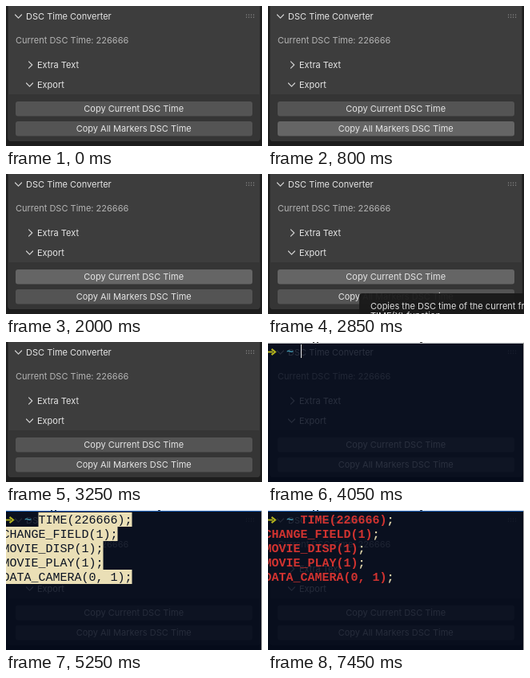
An HTML page that plays this animation: 320 px wide and 176 px high, repeating every 9900 ms.

```html
<!DOCTYPE html>
<html lang="en">
<head>
<meta charset="utf-8">
<title>DSC Time Converter</title>
<style>
  html, body { margin: 0; width: 100%; height: 100%; overflow: hidden; background: #1d1d1d; }
  svg { display: block; width: 100%; height: 100%; }
  .ui { font: 11px Inter, sans-serif; fill: #e6e6e6; }
  .icon { fill: none; stroke: #cfcfcf; stroke-width: 1.2; stroke-linecap: round; stroke-linejoin: round; }
  .mid { text-anchor: middle; }
  .mono { font: 15px "Liberation Mono", monospace; white-space: pre; }
  .bold { font-weight: bold; }
</style>
</head>
<body>
<svg viewBox="0 0 320 176">
  <rect width="320" height="176" fill="#1d1d1d"/>
  <g class="ui">
    <path d="M2.5 0H317.5V166a4 4 0 0 1-4 4H6.5a4 4 0 0 1-4-4Z" fill="#3d3d3d"/>
    <path d="M2.5 111H317.5V166a4 4 0 0 1-4 4H6.5a4 4 0 0 1-4-4Z" fill="#353535"/>
    <path class="icon" d="M11.5 11l4 4.2 4-4.2M28.5 69.8l4.2 4.2-4.2 4.2M25.5 97l4 4.2 4-4.2"/>
    <g id="grip" fill="#8a8a8a"></g>
    <text x="25" y="17">DSC Time Converter</text>
    <text x="12" y="47" fill="#b4b4b4">Current DSC Time: 226666</text>
    <text x="39" y="78">Extra Text</text>
    <text x="39" y="103">Export</text>
    <rect id="current" x="12" y="120" width="296" height="18.5" rx="3"/>
    <rect id="markers" x="12" y="145" width="296" height="18.5" rx="3"/>
    <text class="mid" x="159.7" y="133">Copy Current DSC Time</text>
    <text class="mid" x="159.7" y="158">Copy All Markers DSC Time</text>
    <g id="tip">
      <rect x="114" y="150" width="230" height="50" rx="4" fill="#191919"/>
      <text x="128" y="170">Copies the DSC time of the current frame</text>
      <text x="128" y="182">TIME(X) function.</text>
    </g>
  </g>
  <g id="term">
    <rect id="shade" width="319" height="176" fill="#00081a"/>
    <rect x="319" width="1" height="176" fill="#a0a0a0"/>
    <rect width="320" height="1" fill="#f0f0f0"/>
    <path d="M56 .5h2M61 .5h2M190 .5h3" stroke="#333"/>
    <rect id="edge" y="1" width="319" height="1"/>
    <path d="M0 12.5H6M4.5 8.8L9 12.5 4.5 16.2" fill="none" stroke="#b0af1e" stroke-width="2.2"/>
    <text class="mono bold" x="23" y="17" fill="#3f8fa8">~</text>
    <rect id="cursor" x="41" y="3" width="1" height="17" fill="#e8e8e8"/>
    <g id="pasted"></g>
    <g id="plain"></g>
  </g>
</svg>
<script>
const LOOP = 9900, COL = 9, ROW = 18;
const $ = id => document.getElementById(id);
const LINES = ['TIME(226666);', 'CHANGE_FIELD(1);', 'MOVIE_DISP(1);', 'MOVIE_PLAY(1);', 'DATA_CAMERA(0, 1);'];

function add(parent, tag, attrs, text = '') {
  const el = document.createElementNS('http://www.w3.org/2000/svg', tag);
  for (const k in attrs) el.setAttribute(k, attrs[k]);
  el.textContent = text;
  parent.append(el);
  return el;
}

for (let i = 0; i < 8; i++)
  add($('grip'), 'rect', { x: 300 + i % 4 * 3, y: 10.5 + (i >> 2) * 3, width: 1.2, height: 1.2 });

LINES.forEach((line, i) => {
  const x = i ? -4.5 : 40.5, y = 17.3 + i * ROW, end = line.length - 1;
  add($('pasted'), 'rect', { x, y: 3 + i * ROW, width: line.length * COL, height: ROW, fill: '#eadfb6' });
  add($('pasted'), 'text', { class: 'mono', x, y, fill: '#0a1222' }, line);
  add($('plain'), 'text', { class: 'mono bold', x, y, fill: '#d23330' }, line.slice(0, end));
  add($('plain'), 'text', { class: 'mono bold', x: x + end * COL, y, fill: '#d9cfa6' }, ';');
});

// Each track lists [start ms, value]; values hold until the next step.
const BASE = '#545454', HOVER = '#656565', PRESS = '#4772b3';
const TRACKS = [
  ['current', 'fill', [[0, BASE], [900, HOVER], [1000, BASE], [1850, HOVER], [3000, PRESS], [3250, BASE]]],
  ['markers', 'fill', [[0, BASE], [800, HOVER], [900, BASE]]],
  ['tip', 'opacity', [[0, 0], [2850, .95], [2900, 1], [2950, 0]]],
  ['term', 'opacity', [[0, 0], [4050, 1]]],
  ['shade', 'opacity', [[0, .82], [4100, .83], [4200, .84]]],
  ['edge', 'fill', [[0, '#c4c6c8'], [4100, '#8fa4b8'], [4200, '#4d7ba4'], [4300, '#1c62bc']]],
  ['cursor', 'opacity', [[0, 1], [4550, .5], [4650, 0], [4800, .5], [4850, 1], [5050, 0]]],
  ['pasted', 'opacity', [[0, 0], [5250, 1], [7450, 0]]],
  ['plain', 'opacity', [[0, 0], [7450, 1]]]
];

const start = performance.now();
function draw() {
  const t = (performance.now() - start) % LOOP;
  for (const [id, prop, steps] of TRACKS)
    $(id).style[prop] = steps.findLast(s => s[0] <= t)[1];
  requestAnimationFrame(draw);
}
draw();
</script>
</body>
</html>
```
